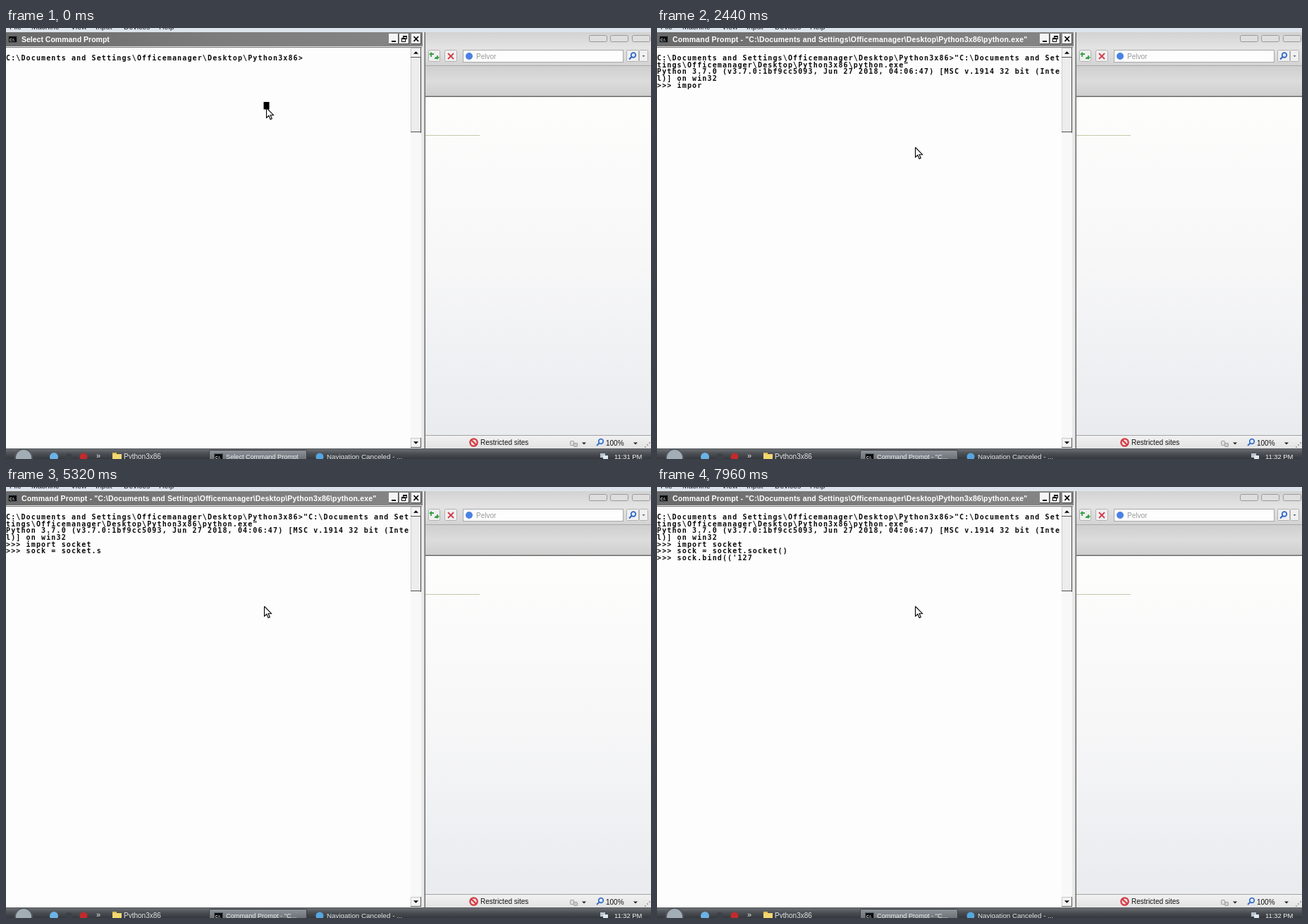
Write an HTML page with a canvas that moves like this. It is 915 px wide and 612 px high and loops after 8000 ms.

```html
<!DOCTYPE html>
<html lang="en">
<head>
<meta charset="utf-8">
<title>Console session</title>
<style>
html, body { margin: 0; width: 100%; height: 100%; overflow: hidden; background: #fdfdfd; }
canvas { display: block; width: 915px; height: 612px; }
</style>
</head>
<body>
<canvas id="stage" width="915" height="612"></canvas>
<script>
const ctx = document.getElementById('stage').getContext('2d');
const LOOP = 8000;
const SANS = '"Liberation Sans", Arial, sans-serif';
const MONO = '"DejaVu Sans Mono", monospace';
const CELL = 7.15, ROW = 9.6, BASE = 46.2, MONO_SIZE = 10;

const HOME = 'C:\\Documents and Settings\\Officemanager\\Desktop\\Python3x86';
const PROGRAM = '"' + HOME + '\\python.exe"';
const BANNER = 'Python 3.7.0 (v3.7.0:1bf9cc5093, Jun 27 2018, 04:06:47) [MSC v.1914 32 bit (Intel)] on win32';

// moments of the session, in ms
const UNSELECT = 240, CLOCK = 600, PASTE = 1280, RUN = 1680, READY = 1880;

function rect(x, y, w, h, fill) {
  ctx.fillStyle = fill;
  ctx.fillRect(x, y, w, h);
}

function frame(x, y, w, h, color) {
  ctx.strokeStyle = color;
  ctx.lineWidth = 1;
  ctx.strokeRect(x + 0.5, y + 0.5, w - 1, h - 1);
}

function roundBox(x, y, w, h, r, fill, stroke) {
  ctx.beginPath();
  ctx.roundRect(x + 0.5, y + 0.5, w - 1, h - 1, r);
  ctx.fillStyle = fill;
  ctx.fill();
  ctx.strokeStyle = stroke;
  ctx.lineWidth = 1;
  ctx.stroke();
}

function shade(x0, y0, x1, y1, ...colors) {
  const g = ctx.createLinearGradient(x0, y0, x1, y1);
  colors.forEach((c, i) => g.addColorStop(i / (colors.length - 1), c));
  return g;
}

function disc(x, y, r, fill) {
  ctx.beginPath();
  ctx.arc(x, y, r, 0, Math.PI * 2);
  ctx.fillStyle = fill;
  ctx.fill();
}

function path(points, color, width = 1) {
  ctx.beginPath();
  points.forEach(([x, y]) => ctx.lineTo(x, y));
  ctx.strokeStyle = color;
  ctx.lineWidth = width;
  ctx.stroke();
}

function poly(points, fill) {
  ctx.beginPath();
  points.forEach(([x, y]) => ctx.lineTo(x, y));
  ctx.closePath();
  ctx.fillStyle = fill;
  ctx.fill();
}

// small solid triangle; dir is 1 for down, -1 for up
function caret(x, y, dir = 1, color = '#222', r = 3) {
  poly([[x - r, y - dir * r / 2], [x + r, y - dir * r / 2], [x, y + dir * r / 2]], color);
}

function text(str, x, y, size, color, weight = '', family = SANS, spacing = 0) {
  ctx.font = `${weight} ${size}px ${family}`;
  ctx.letterSpacing = spacing + 'px';
  ctx.fillStyle = color;
  ctx.fillText(str, x, y);
}

function promptIcon(x, y) {
  rect(x, y, 13, 10, '#55606a');
  rect(x + 1, y + 1, 11, 8, '#0c0c0c');
  text('C:\\', x + 2, y + 7.5, 5, '#eee', 'bold');
}

function lens(x, y, color) {
  ctx.beginPath();
  ctx.arc(x + 1, y - 1, 3.3, 0, Math.PI * 2);
  ctx.fillStyle = '#dcecff';
  ctx.fill();
  ctx.strokeStyle = color;
  ctx.lineWidth = 1.7;
  ctx.stroke();
  path([[x - 1.5, y + 1.5], [x - 5, y + 5]], color, 2.2);
}

function menuStrip() {
  rect(0, 0, 915, 6, '#dce3ec');
  const items = { File: 5, Machine: 36, View: 92, Input: 127, Devices: 167, Help: 217 };
  for (const name in items) text(name, items[name], 2, 10.5, '#222');
}

function browser() {
  rect(594, 6, 321, 20, shade(0, 6, 0, 26, '#d2d2d2', '#e2e2e2'));
  for (const x of [827, 857, 888]) roundBox(x, 10, 26, 10, 2, '#dedede', '#999');

  rect(594, 26, 321, 28, shade(0, 26, 0, 54, '#e4e4e4', '#d3d3d3'));
  roundBox(599, 31, 17, 17, 2, '#f0f0f0', '#b2b2b2');
  path([[603, 41], [603, 37], [607, 37]], '#35a045', 1.8);
  poly([[600, 38], [606, 38], [603, 34]], '#35a045');
  path([[608, 43], [612, 43], [612, 39]], '#35a045', 1.8);
  poly([[609, 41], [615, 41], [612, 45]], '#35a045');
  roundBox(622, 31, 18, 17, 2, '#f0f0f0', '#b2b2b2');
  path([[627, 36], [635, 44]], '#d23b4c', 1.8);
  path([[635, 36], [627, 44]], '#d23b4c', 1.8);

  rect(648, 31, 228, 18, '#fdfdfd');
  frame(648, 31, 228, 18, '#a8a8a8');
  disc(657, 40, 5, '#4a82e4');
  text('Pelvor', 667, 44, 10, '#999');
  roundBox(880, 31, 18, 17, 1, '#f0f0f0', '#b2b2b2');
  roundBox(898, 31, 13, 17, 1, '#f0f0f0', '#b2b2b2');
  lens(889, 39.5, '#2f62c4');
  caret(904.5, 40, 1, '#456', 2);

  rect(594, 53, 321, 1, '#a9a9a9');
  rect(594, 54, 321, 43, shade(0, 54, 0, 97, '#cfcfcf', '#dcdcdc', '#cecece'));
  rect(594, 98, 321, 480, shade(0, 98, 0, 578, '#fdfdfc', '#f7f7f8', '#e9ebee'));
  rect(594, 96.5, 321, 1.5, '#6c6c6c');
  rect(595, 152, 77, 1, '#c6c8ac');

  rect(594, 578, 321, 1, '#a4a4a4');
  rect(594, 579, 321, 19, shade(0, 579, 0, 598, '#f1f1f1', '#e2e2e2'));
  disc(663.5, 588.5, 6.3, '#d23a42');
  disc(663.5, 588.5, 4, '#f3dada');
  path([[660, 585], [667, 592]], '#d23a42', 2.2);
  text('Restricted sites', 673, 592, 10, '#111');
  roundBox(800, 586, 6, 7, 1, '#ddd', '#999');
  roundBox(805, 589, 6, 6, 1, '#ccc', '#999');
  caret(820, 590);
  lens(843, 588, '#3b71c2');
  text('100%', 851, 592.5, 10, '#111');
  caret(893, 590);
  for (let i = 0; i < 3; i++) rect(912 - i * 3, 588 + i * 3, 2, 2, '#aaa');
}

function scrollButton(y, dir) {
  rect(574, y, 15, 14, '#f3f3f3');
  frame(574, y, 15, 14, '#c8c8c8');
  rect(574, y + 13, 15, 1, '#555');
  rect(588, y, 1, 14, '#555');
  caret(581.5, y + 7, dir, '#000', 3.5);
}

function consoleWindow(title, spacing) {
  rect(0, 6, 594, 592, '#e9e9e9');
  rect(0, 6, 591, 20, shade(0, 0, 591, 0, '#696969', '#7c7c7c', '#858585'));
  promptIcon(3, 11);
  text(title, 22, 20, 10.5, '#fff', 'bold', SANS, spacing);

  for (const x of [543, 558, 575]) {
    rect(x, 8, 14, 15, '#f5f5f5');
    rect(x, 22, 14, 1, '#444');
    rect(x + 13, 8, 1, 15, '#444');
  }
  rect(547, 18, 6, 2, '#000');
  frame(563, 11, 6, 5, '#000');
  rect(563, 11, 6, 2, '#000');
  rect(561, 14, 6, 6, '#f5f5f5');
  frame(561, 14, 6, 6, '#000');
  rect(561, 14, 6, 2, '#000');
  path([[578.5, 12], [585, 19]], '#000', 1.8);
  path([[585, 12], [578.5, 19]], '#000', 1.8);

  rect(0, 27, 590, 1, '#777');
  rect(0, 28, 574, 569, '#fdfdfd');
  rect(574, 28, 15, 569, '#f8f8f8');
  rect(574, 42, 15, 107, '#ededed');
  rect(574, 42, 1, 106, '#ccc');
  rect(588, 42, 1, 107, '#444');
  rect(574, 147, 15, 1, '#555');
  scrollButton(28, -1);
  scrollButton(582, 1);
  rect(593.5, 6, 1.5, 592, '#6c6c6c');
}

function taskbar(label, clock) {
  rect(0, 597, 915, 15, shade(0, 597, 0, 612, '#6f7378', '#4b4f54', '#34383c'));
  rect(0, 597, 915, 1, '#55595d');
  disc(25, 610, 13, '#53595f');
  disc(25, 610, 11, '#a3adb5');
  disc(68, 609, 6, '#6cb2e4');
  disc(89, 609, 5, '#3c4147');
  disc(110, 609, 5.5, '#c22a2c');
  text('»', 128, 611, 11, '#eee');
  rect(151, 603, 6, 3, '#e5bd4c');
  rect(151, 605, 13, 7, '#f3d872');
  text('Python3x86', 167, 612, 10, '#e4e6e8');

  roundBox(288, 599, 139, 16, 2, shade(0, 599, 0, 612, '#8f959b', '#6c7278'), '#3a3e42');
  promptIcon(295, 604);
  ctx.save();
  ctx.beginPath();
  ctx.rect(290, 598, 128, 14);
  ctx.clip();
  text(label, 312, 612, 9.2, '#f2f2f2');
  ctx.restore();
  disc(445, 609, 5.5, '#57a5df');
  text('Navigation Canceled - ...', 455, 612, 9.8, '#e6e8ea');

  rect(843, 604, 7, 6, '#b8c5d1');
  rect(847, 607, 7, 5, '#dfe7ee');
  text(clock, 863, 612, 9.4, '#f2f2f2');
}

// the part of str typed so far when its characters are spread evenly from a to b
function typed(t, str, a, b) {
  if (t < a) return '';
  const n = 1 + Math.floor((t - a) * (str.length - 1) / (b - a) + 1e-6);
  return str.slice(0, n);
}

function wrap(str) {
  const rows = [];
  for (let i = 0; i < str.length; i += 80) rows.push(str.slice(i, i + 80));
  return rows;
}

function sessionRows(t) {
  const rows = wrap(HOME + '>' + (t >= PASTE ? PROGRAM : ''));
  if (t >= RUN + 120) rows.push(...wrap(BANNER));
  if (t >= READY) rows.push('>>> ' + typed(t, 'import socket', 2160, 2950));
  if (t >= 3000) {
    rows.push('>>> ' + typed(t, 'sock = socket.s', 4000, 5310) + typed(t, 'ocket()', 5390, 5800));
  }
  if (t >= 5880) {
    const quote = t >= 7720 ? "'" : '';
    rows.push('>>> ' + typed(t, 's', 6080, 6081) + typed(t, 'ock.bind', 6240, 6600) +
      typed(t, '((', 6780, 6900) + quote + typed(t, '127', 7000, 7200));
  }
  return rows;
}

function session(t) {
  const rows = sessionRows(t);
  const gap = CELL - MONO_SIZE * 0.602;
  rows.forEach((row, i) =>
    text(row, 0, Math.round(BASE + i * ROW), MONO_SIZE, '#0a0a0a', 'bold', MONO, gap));
  const lit = (t >= 920 && t < 1120) || (t >= PASTE && t < RUN);
  if (lit) {
    const last = rows.length - 1;
    rect(rows[last].length * CELL + 1, BASE + last * ROW - 1.5, 7, 2, '#000');
  }
}

function pointer(t) {
  const p = Math.min(1, Math.max(0, (t - 260) / 500));
  const e = p * p * (3 - 2 * p);
  const x = 369.5 - 3 * e, y = 113.5 + 56 * e;
  const shape = [[0, 0], [0, 14], [3.3, 11], [5.6, 16.3], [7.8, 15.3], [5.6, 10.2], [10, 10.2]]
    .map(([dx, dy]) => [x + dx, y + dy]);
  poly(shape, '#fff');
  path([...shape, shape[0]], '#000', 1.1);
}

function draw(now) {
  const t = now % LOOP;
  const running = t >= RUN;
  const selecting = t < UNSELECT;
  const name = (selecting ? 'Select ' : '') + 'Command Prompt';
  menuStrip();
  browser();
  consoleWindow(running ? name + ' - ' + PROGRAM : name, running ? 0.17 : 0);
  session(t);
  if (selecting) rect(365.5, 105, 8, 10.5, '#000');
  pointer(t);
  taskbar(running ? name + ' - "C...' : name, t < CLOCK ? '11:31 PM' : '11:32 PM');
  requestAnimationFrame(draw);
}

requestAnimationFrame(draw);
</script>
</body>
</html>
```
